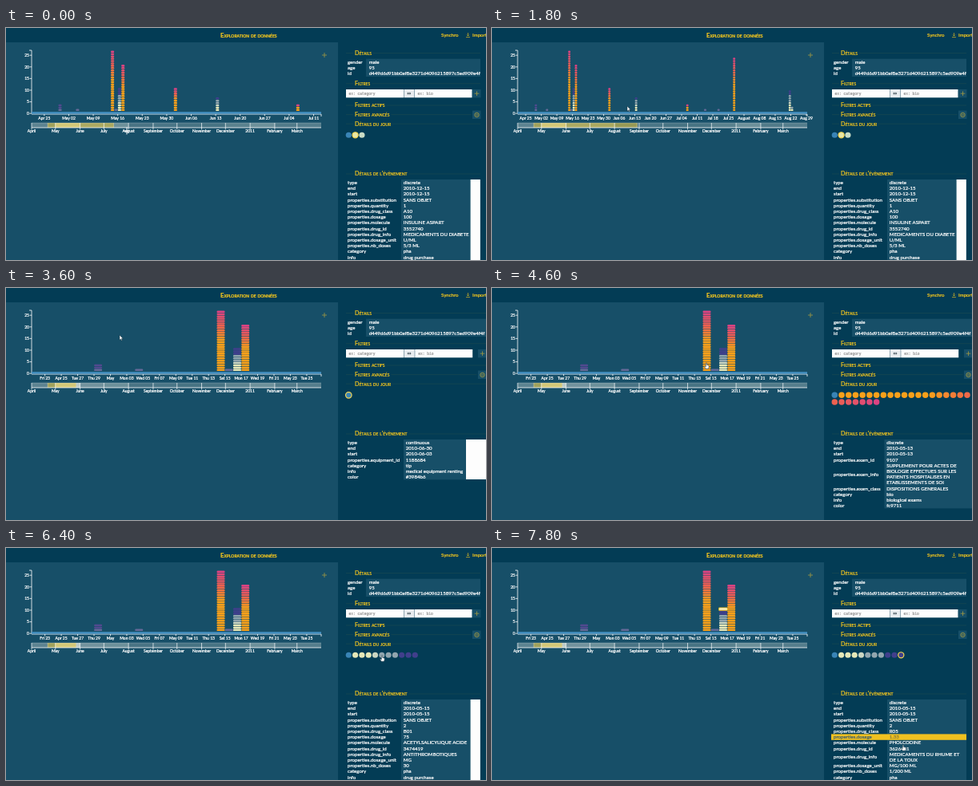
An HTML page with a canvas that plays this animation: 600 px wide and 291 px high, repeating every 8000 ms.

```html
<!DOCTYPE html>
<html lang="fr">
<head>
<meta charset="utf-8">
<title>Exploration de données</title>
<style>
html, body { margin: 0; width: 100%; height: 100%; overflow: hidden; background: #033c55; }
canvas { display: block; width: 600px; height: 291px; }
</style>
</head>
<body>
<canvas id="stage"></canvas>
<script>
const W = 600, H = 291, LOOP = 8000, STEP = 200;
const cv = document.getElementById('stage');
const c = cv.getContext('2d');
const dpr = window.devicePixelRatio || 1;
cv.width = W * dpr;
cv.height = H * dpr;

const DARK = '#033c55', PANEL = '#174f68', BUTTON = '#174f68';
const GOLD = '#f3c51f', DIM_GOLD = '#a39a42', BLUE = '#3984b6', WHITE = '#fff';
const X0 = 32, X1 = 394, BASE = 107.2, UNIT = 2.92;
const START = 20.37;           // first visible day, counted from 1 April 2010
const YEAR = 364.5;
const DAY = ['Sun', 'Mon', 'Tue', 'Wed', 'Thu', 'Fri', 'Sat'];
const MONTH = ['January', 'February', 'March', 'April', 'May', 'June', 'July', 'August',
  'September', 'October', 'November', 'December'];

// [time, visible days]
const SPAN = [[0, 82.8], [800, 115.4], [1200, 130], [2400, 130], [3200, 35.4], [8000, 35.4]];
// [time, x, y]
const POINTER = [[0, 151, 129], [800, 177, 132], [1200, 186, 127], [1800, 169, 98], [2200, 176, 107],
  [2400, 183, 122], [3200, 92, 123], [3600, 142, 59], [4400, 266, 90], [4600, 268, 94],
  [5000, 274, 90], [5400, 289, 88], [6000, 430, 130], [6400, 470, 135], [6800, 511, 134],
  [7200, 511, 135], [7800, 514, 247]];

// [day, count, palette], stacked above the continuous event
const BARS = [[28, 3, 'violet'], [33, 1, 'violet'], [43, 26, 'warm'], [44, 1, 'violet'], [45, 10, 'pale'],
  [46, 20, 'warm'], [61, 10, 'warm'], [73, 6, 'pale'], [96, 3, 'warm'], [104, 1, 'violet'],
  [110, 1, 'violet'], [117, 23, 'warm'], [142, 9, 'pale'], [143, 2, 'pale']];
const MONTH_FILL = [.34, .8, .44, .42, .24, .25, .23, .23, .32, .42, .28, .3];

const drug = (date, qty, cls, dosage, molecule, id, info, unit, doses) => [
  ['type', 'discrete'], ['end', date], ['start', date],
  ['properties.substitution', 'SANS OBJET'], ['properties.quantity', qty],
  ['properties.drug_class', cls], ['properties.dosage', dosage],
  ['properties.molecule', molecule], ['properties.drug_id', id],
  ['properties.drug_info', ...info], ['properties.dosage_unit', unit],
  ['properties.nb_doses', doses], ['category', 'pha'], ['info', 'drug purchase']];

const SCENES = [
  { from: 0, circles: ['#3984b6', '#e9e7a8', '#c9dcc6'], pick: 1, valueX: 494, bar: [580.6, 592.8, 291],
    rows: drug('2010-12-15', '1', 'A10', '100', 'INSULINE ASPART', '3552740',
      ['MEDICAMENTS DU DIABETE'], 'U/ML', '5/3 ML') },
  { from: 2200, wide: true, circles: [BLUE], pick: 0, valueX: 497, bar: [575, 600, 240],
    rows: [['type', 'continuous'], ['end', '2010-06-30'], ['start', '2010-06-03'],
      ['properties.equipment_id', '1188684'], ['category', 'tip'],
      ['info', 'medical equipment renting'], ['color', '#3984b6']] },
  { from: 4400, wide: true, circles: dayCircles(26, 'warm'), valueX: 490.5,
    rows: [['type', 'discrete'], ['end', '2010-05-13'], ['start', '2010-05-13'],
      ['properties.exam_id', '9107'],
      ['properties.exam_info', 'SUPPLEMENT POUR ACTES DE', 'BIOLOGIE EFFECTUES SUR LES',
        'PATIENTS HOSPITALISES EN', 'ETABLISSEMENTS DE SOI'],
      ['properties.exam_class', 'DISPOSITIONS GENERALES'], ['category', 'bio'],
      ['info', 'biological exams'], ['color', 'fc9711']] },
  { from: 5400, circles: dayCircles(10, 'pale'), valueX: 494, bar: [580.6, 592.8, 291],
    rows: drug('2010-05-15', '2', 'B01', '75', 'ACETYLSALICYLIQUE ACIDE', '3474419',
      ['ANTITHROMBOTIQUES'], 'MG', '30') },
  { from: 6800, circles: dayCircles(10, 'pale'), pick: 10, valueX: 494, mark: true,
    rows: drug('2010-05-15', '2', 'R05', '1.33', 'PHOLCODINE', '3626481',
      ['MEDICAMENTS DU RHUME ET', 'DE LA TOUX'], 'MG/100 ML', '1/200 ML') }
];

function mix(a, b, k) {
  return `rgb(${a.map((v, i) => Math.round(v + (b[i] - v) * k))})`;
}

function tone(kind, i, n) {
  if (kind === 'violet') return i ? '#514a8f' : '#656a98';
  if (kind === 'pale') {
    const f = i / n;
    return f < .3 ? '#e6e8b8' : f < .4 ? '#cbd6c2' : f < .7 ? '#91a5ae' : '#403f8c';
  }
  const f = n > 1 ? i / (n - 1) : 0;
  if (f < .5) return '#f9a01a';
  if (f < .75) return mix([249, 160, 26], [238, 98, 78], (f - .5) * 4);
  return mix([238, 98, 78], [219, 67, 130], (f - .75) * 4);
}

function dayCircles(n, kind) {
  return [BLUE, ...Array.from({ length: n }, (_, i) => tone(kind, i, n))];
}

// Linear interpolation through keyed rows, for column k.
function at(keys, t, k = 1) {
  const j = keys.findIndex(r => r[0] > t);
  if (j < 0) return keys[keys.length - 1][k];
  const a = keys[j - 1], b = keys[j];
  return a[k] + (b[k] - a[k]) * (t - a[0]) / (b[0] - a[0]);
}

function rect(x, y, w, h, fill) {
  c.fillStyle = fill;
  c.fillRect(x, y, w, h);
}

function line(x1, y1, x2, y2, color = WHITE, w = .8) {
  c.strokeStyle = color;
  c.lineWidth = w;
  c.beginPath();
  c.moveTo(x1, y1);
  c.lineTo(x2, y2);
  c.stroke();
}

function dot(x, y, r, fill, ring, ringWidth = 1.2) {
  c.beginPath();
  c.arc(x, y, r, 0, 7);
  c.fillStyle = fill;
  c.fill();
  if (ring) {
    c.strokeStyle = ring;
    c.lineWidth = ringWidth;
    c.stroke();
  }
}

// Small type gets a hairline outline to look a little heavier.
function text(s, x, y, size = 6.1, color = WHITE, align = 'left', style = '', family = 'Lato, sans-serif') {
  c.font = `${style} ${size}px ${family}`;
  c.fillStyle = c.strokeStyle = color;
  c.textAlign = align;
  c.lineWidth = .24;
  c.lineJoin = 'round';
  c.strokeText(s, x, y + size * .34);
  c.fillText(s, x, y + size * .34);
}

const plus = (x, y, r, color) => {
  line(x - r, y, x + r, y, color);
  line(x, y - r, x, y + r, color);
};

const date = d => new Date(Date.UTC(2010, 3, 1 + d));
const yearX = d => X0 + d * (X1 - X0) / YEAR;

function tickLabel(d) {
  const day = d.getUTCDate(), m = MONTH[d.getUTCMonth()];
  const dd = String(day).padStart(2, '0');
  if (day === 1) return m;
  return (d.getUTCDay() ? DAY[d.getUTCDay()] : m.slice(0, 3)) + ' ' + dd;
}

function drawHeader() {
  rect(0, 0, W, H, DARK);
  rect(0, 18, 415, H - 18, PANEL);
  text('Exploration de données', 268, 9, 7.7, GOLD, 'left', 'small-caps bold');
  text('Synchro', 544, 8.8, 6.1, GOLD);
  line(577.5, 6, 577.5, 10, GOLD, .6);
  line(576, 8.5, 577.5, 10, GOLD, .6);
  line(579, 8.5, 577.5, 10, GOLD, .6);
  line(575, 11.5, 580, 11.5, GOLD, .6);
  text('Import', 583, 8.8, 6.1, GOLD);
}

function drawChart(span, scene) {
  const scale = (X1 - X0) / span;
  const x = d => X0 + (d - START) * scale;

  line(X0, 28, X0, BASE);
  line(X0 - 3, 28, X0, 28);
  for (let v = 0; v <= 25; v += 5) {
    const y = BASE - v * UNIT;
    line(X0 - 2.5, y, X0, y);
    text(v, 29, y, 5, WHITE, 'right');
  }
  plus(398, 34, 3, DIM_GOLD);

  const pill = (d, i, w, h, grow = 0) => {
    c.beginPath();
    c.roundRect(x(d) + .1 - grow, BASE - (i + 2) * UNIT + .2 - grow, w - .2 + 2 * grow, h + 2 * grow, 1.2);
    c.fill();
  };
  c.save();
  c.beginPath();
  c.rect(X0, 18, X1 - X0, 90);
  c.clip();
  const w = Math.max(scale, 3.2);
  for (const [d, n, kind] of BARS) {
    for (let i = 0; i < n; i++) {
      c.fillStyle = tone(kind, i, n);
      pill(d, i, w, 2.55);
    }
  }
  if (scene.mark) {
    c.fillStyle = GOLD;
    pill(45, 9, w, 2.55, .8);
    c.fillStyle = '#f4edc0';
    pill(45, 9, w, 2.55);
  }
  c.restore();

  rect(X0, 105.2, X1 - X0, 2.5, '#428fc1');
  line(X0, 108.2, X1, 108.2, '#c8dce7');
  line(X1, 108, X1, 111);
  const weekly = span > 56;
  for (let d = Math.ceil(START); d <= START + span; d++) {
    const when = date(d);
    if (weekly ? when.getUTCDay() !== 0 : when.getUTCDate() % 2 === 0) continue;
    line(x(d), 108, x(d), 110.3);
    text(tickLabel(when), x(d), 113.6, 5, WHITE, 'center');
  }
}

function drawOverview(span) {
  const top = 119, h = 6;
  const starts = MONTH_FILL.map((_, i) => (Date.UTC(2010, 3 + i, 1) - Date.UTC(2010, 3, 1)) / 864e5);
  MONTH_FILL.forEach((a, i) => {
    const a0 = yearX(starts[i]), a1 = yearX(starts[i + 1] || YEAR);
    rect(a0, top, a1 - a0, h, `rgba(232,235,225,${a})`);
  });
  const b0 = yearX(START), b1 = yearX(START + span);
  rect(b0, top, b1 - b0, h, 'rgba(235,195,35,.48)');
  line(b0, top, b0, top + h, '#d8cf92', .6);
  line(b1, top, b1, top + h, '#d8cf92', .6);
  line(X0, top, X1, top, 'rgba(230,238,240,.4)', .6);
  line(X0, top + h, X1, top + h);
  starts.forEach((d, i) => {
    line(yearX(d), top, yearX(d), 127.5, WHITE, .7);
    text(i === 9 ? '2011' : MONTH[(i + 3) % 12], yearX(d), 129.6, 5, WHITE, 'center');
  });
}

function heading(s, y, right) {
  const faint = 'rgba(243,197,31,.1)';
  text(s, 436, y, 7.15, GOLD, 'left', 'small-caps');
  const end = 438 + c.measureText(s).width;
  line(425, y, 434, y, faint, .6);
  line(end, y, right, y, faint, .6);
}

function drawFilters(scene) {
  const right = scene.wide ? 600 : 593, icon = scene.wide ? 595.5 : 588.5;
  heading('Détails', 31.5, right);
  rect(450, 38.7, right - 450, 22.3, PANEL);
  const id = 'd449d6d91bb0af8e3271d4096215897c5ed909e4f4f';
  [['gender', 'male'], ['age', '95'], ['id', id]].forEach(([k, v], i) => {
    const y = 43 + i * 7.2;
    text(k, 427, y);
    c.save();
    c.beginPath();
    c.rect(450, 38, right - 450, 24);
    c.clip();
    text(v, 453.7, y);
    c.restore();
  });

  heading('Filtres', 69.7, right);
  const mono = '"Liberation Mono", monospace';
  const mid = scene.wide ? 511.2 : 510.5;
  rect(425, 77, 72, 10.3, '#fdfdfd');
  rect(497.4, 77, mid - 497.8, 10.3, '#e9ecef');
  rect(mid, 77, 72, 10.3, '#fdfdfd');
  text('ex: category', 428.5, 82.2, 4.6, '#999', 'left', '', mono);
  text('ex: bio', mid + 4, 82.2, 4.6, '#999', 'left', '', mono);
  text('↔', (497 + mid) / 2, 82.2, 6, '#44545c', 'center', '', '"DejaVu Sans", sans-serif');
  rect(icon - 5.5, 77, 10.5, 10.3, BUTTON);
  plus(icon, 82.2, 2.8, DIM_GOLD);

  heading('Filtres actifs', 97, right);
  heading('Filtres avancés', 108.6, icon - 7);
  heading('Détails du jour', 120.2, right);
  rect(icon - 5.5, 103.6, 10.5, 10.4, BUTTON);
  dot(icon, 109, 2.7, BUTTON, DIM_GOLD, .9);
  dot(icon, 109, 1, BUTTON, DIM_GOLD, .6);

  const step = scene.wide ? 8.72 : 8.3, perRow = 20;
  scene.circles.forEach((fill, i) => {
    const x = 428.3 + (i % perRow) * step, y = 134.3 + Math.floor(i / perRow) * step;
    dot(x, y, step * .43, fill, i === scene.pick ? '#f6d650' : '');
  });
}

function drawEvent(scene) {
  const right = scene.wide ? 600 : 593, rh = 7.2;
  heading("Détails de l'évènement", 183, right);
  const lines = scene.rows.reduce((n, r) => n + r.length - 1, 0);
  const vx = scene.valueX;
  rect(vx, 190, right - vx, lines * rh, PANEL);
  let y = 194;
  for (const [key, ...values] of scene.rows) {
    const hot = scene.hot && key === 'properties.dosage';
    if (hot) rect(424, y - 3.8, right - 424, rh + .2, '#f0c120');
    text(key, 427, y + (values.length - 1) * rh / 2, 6.1, hot ? '#41606a' : WHITE);
    for (const v of values) {
      text(v, vx + 2.8, y, 6.1, hot ? '#8a7d3c' : WHITE);
      y += rh;
    }
  }
  if (scene.bar) {
    const [a, b, bottom] = scene.bar;
    rect(a, 190, b - a, bottom - 190, '#fdfdfd');
  }
}

function shape(points, x, y) {
  c.beginPath();
  points.forEach(([px, py]) => c.lineTo(x + px, y + py));
  c.closePath();
  c.fillStyle = '#fff';
  c.fill();
  c.strokeStyle = '#17303c';
  c.lineWidth = .5;
  c.stroke();
}

const ARROW = [[0, 0], [0, 6.2], [1.4, 5], [2.3, 7], [3.2, 6.6], [2.4, 4.6], [4.2, 4.5]];
const HAND = [[-.6, 0], [.6, 0], [.7, 2.6], [3.2, 3.2], [3.1, 5.7], [2.4, 7.2], [-.8, 7.2], [-2.5, 4.6], [-1.8, 4], [-.7, 5]];

function drawPointer(t) {
  const x = at(POINTER, t), y = at(POINTER, t, 2);
  const dragging = t <= 1200 || (t >= 2400 && t <= 3200);
  if (dragging) {
    line(x, y - 4.5, x, y + 4.5, '#fff', 1);
    line(x - 4, y, x + 4, y, '#fff', 1);
  } else {
    shape(t < 4400 ? ARROW : HAND, x, y);
  }
}

function draw(now) {
  const t = Math.floor((now % LOOP) / STEP) * STEP;
  const scene = SCENES.filter(s => s.from <= t).pop();
  const span = at(SPAN, t);
  scene.hot = t >= 7600;
  c.setTransform(dpr, 0, 0, dpr, 0, 0);
  drawHeader();
  drawChart(span, scene);
  drawOverview(span);
  drawFilters(scene);
  drawEvent(scene);
  drawPointer(t);
}

const begin = performance.now();
function tick() {
  draw(performance.now() - begin);
  requestAnimationFrame(tick);
}
tick();
</script>
</body>
</html>
```
